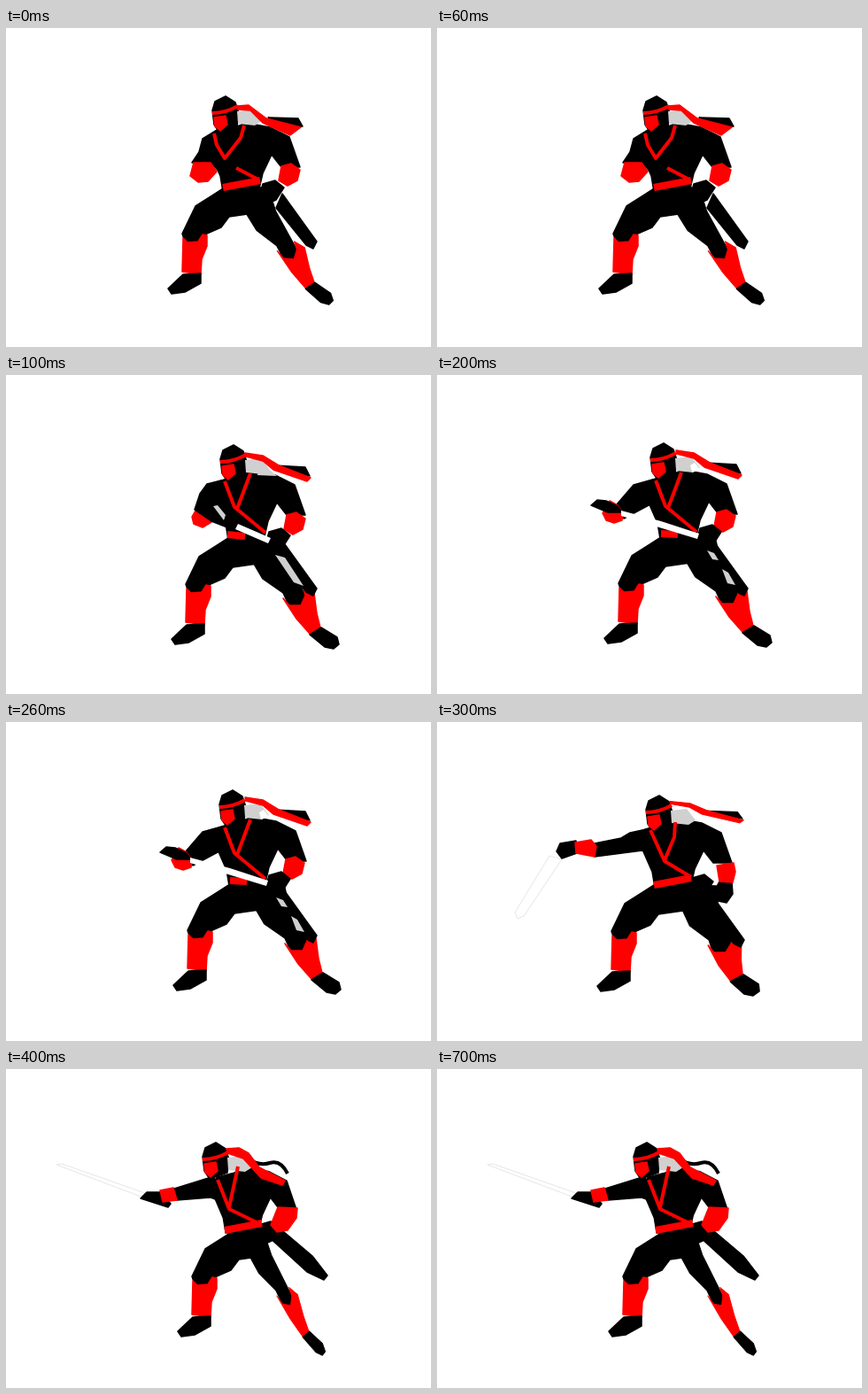
Recreate the animation shown at these times as an HTML page without scripts. Size 480 by 360 pixels, loop 0.9 s.

```html
<!DOCTYPE html>
<html lang="en">
<head>
<meta charset="utf-8">
<title>Ninja draws a sword</title>
<style>
  html, body { margin: 0; width: 100%; height: 100%; overflow: hidden; background: #fff; }
  svg { display: block; width: 100vw; height: 100vh; }
  path { fill: #000; stroke: #000; stroke-width: 1.5; stroke-linejoin: round; }
  .red { fill: #fe0000; stroke: #fe0000; }
  .grey { fill: #d0d0d0; stroke: none; }
  .steel { fill: #fff; stroke: none; }
  .edge { fill: #fff; stroke: #e6e6e6; stroke-width: 1; }
  .trim { fill: none; stroke: #fe0000; stroke-width: 4; }
  .belt { stroke-width: 8; }
  .ribbon { fill: none; stroke-width: 4; }
  .hip { transform-origin: 285px 200px; }
  .waist { transform-origin: 251px 186px; }
  .tip { transform-origin: 344px 115px; }

  .pose { visibility: hidden; animation: flash .9s calc(var(--n) * .1s) step-end infinite; }
  .last { animation-name: hold; }
  @keyframes flash { 0% { visibility: visible } 11.1111%, 100% { visibility: hidden } }
  @keyframes hold { 0% { visibility: visible } 55.5556%, 100% { visibility: hidden } }
</style>
</head>
<body>
<svg viewBox="0 0 480 360">
  <defs>
    <g id="head">
      <path d="M242 95L245 85 257 79 268 86 272 98 270 113 250 120 244 111Z"/>
      <path class="grey" d="M270 96L288 94 298 107 290 112 271 110Z"/>
      <path class="trim" d="M242 98Q257 98 271 90"/>
      <path class="red" d="M244 103L257 101 259 111 251 118 245 113Z"/>
    </g>
    <g id="tail">
      <path d="M303 102L338 104 343 114 324 109Z"/>
      <path class="red" d="M270 88L290 91 308 102 344 116 340 120 302 107 290 97 271 92Z"/>
    </g>
    <path id="chest" d="M240 120L260 115 277 108 304 113 326 124 338 158 317 158 306 144 296 165 292 182 251 186 248 168 237 143Z"/>
    <path id="hand" d="M297 177L311 173 321 181 312 195 303 199 294 188Z"/>
    <path id="glove" class="red" d="M317 158L328 155 338 162 335 174 324 180 314 174Z"/>
    <path id="belt" class="trim belt" d="M245 182L287 174"/>
    <path id="sheath" d="M305 203L312 187 351 241 347 249 339 245Z"/>
    <path id="collar" class="trim" d="M247 120L258 149 293 178M276 111L261 151"/>
    <g id="left">
      <path d="M251 184L237 193 218 205 203 236 206 245 222 246 231 236 247 229 256 217 284 213 292 184Z"/>
      <path class="red" d="M204 241L209 246 221 245 226 237 231 238 231 250 225 265 224 282 203 279Z"/>
      <path d="M204 282L224 281 224 292 206 302 191 304 187 298Z"/>
    </g>
    <g id="right">
      <path d="M270 184L280 213 290 230 313 246 319 259 333 260 338 249 317 207 312 185Z"/>
      <path class="red" d="M313 252L320 260 333 260 338 249 336 240 348 246 351 269 355 285 343 292 328 275Z"/>
      <path d="M343 293L356 285 374 296 376 304 370 309 360 307Z"/>
    </g>
  </defs>

  <!-- guard -->
  <g class="pose" style="--n:0">
    <use href="#left" x="-4" y="-4"/>
    <use href="#right" class="hip" transform="matrix(.9 .06 .12 1 -10 -2)"/>
    <use href="#sheath"/>
    <use href="#chest" x="-6" y="-1"/>
    <path d="M240 114L222 125 218 140 210 152 231 152 243 164 250 150Z"/>
    <use href="#head" x="-9" y="-2"/>
    <path d="M296 101L330 102 335 111 320 112Z"/>
    <path class="red" d="M261 88L274 87 294 102 333 112 321 121 290 107 276 93 262 92Z"/>
    <path class="red" d="M212 152L231 152 238 162 228 173 217 174 208 167Z"/>
    <use href="#glove" x="-6" y="-2"/>
    <use href="#hand" x="-7" y="-1"/>
    <use href="#belt" y="-2"/>
    <path class="trim" d="M235 119L238 132 247 147 265 124 269 110M260 158L283 170"/>
  </g>

  <!-- grip -->
  <g class="pose" style="--n:1">
    <use href="#left"/>
    <use href="#right"/>
    <use href="#sheath"/>
    <path class="grey" d="M304 203L315 206 336 238 325 234Z"/>
    <use href="#chest"/>
    <path class="red" d="M214 153L232 166 222 172 212 168 210 160Z"/>
    <path d="M247 118L227 123 219 134 213 152 232 165 250 172 246 140Z"/>
    <use href="#head"/>
    <path class="grey" d="M286 97L306 114 284 113Z"/>
    <use href="#tail"/>
    <use href="#glove"/>
    <path class="trim belt" d="M250 180L270 182"/>
    <use href="#collar"/>
    <path class="grey" d="M234 148L239 147 248 158 246 164Z"/>
    <use href="#hand"/>
    <path class="steel" d="M262 168L299 184 296 190 259 174Z"/>
  </g>

  <!-- unsheathe -->
  <g class="pose" style="--n:2">
    <use href="#left" x="2" y="-1"/>
    <use href="#right" x="2" y="-2"/>
    <use href="#sheath"/>
    <path class="grey" d="M305 198L313 201 318 209 311 208ZM322 219L329 223 337 237 328 235Z"/>
    <use href="#chest" x="1" y="-1"/>
    <path d="M247 117L222 124 203 146 211 162 239 147 250 140Z"/>
    <path class="red" d="M195 142L204 147 210 156 209 164 200 167 191 164 187 156Z"/>
    <path d="M174 147L181 141 191 142 204 148 209 155 193 155Z"/>
    <use href="#head" x="-1" y="-2"/>
    <use href="#tail" y="-3"/>
    <path class="steel" d="M286 102L291 99 297 107 288 110Z"/>
    <use href="#glove" x="-1" y="-3"/>
    <path class="trim belt" d="M253 179L272 180"/>
    <use href="#collar" y="-1"/>
    <use href="#hand" y="-4"/>
    <path class="steel" d="M208 153L253 165 296 179 294 185 208 159Z"/>
  </g>

  <!-- swing -->
  <g class="pose" style="--n:3">
    <path class="edge" d="M127 151L141 155 98 219 91 222 88 215Z"/>
    <use href="#left" x="-6"/>
    <use href="#right" class="hip" transform="matrix(1.04 0 -.15 1 0 0)"/>
    <use href="#sheath" x="-4" y="5"/>
    <use href="#chest" x="-5" y="1"/>
    <path d="M241 120L218 125 208 131 178 137 178 152 232 145 245 150Z"/>
    <path d="M135 146L139 137 157 134 158 148 141 154Z"/>
    <use href="#head" x="-6" y="4"/>
    <use href="#tail" class="tip" transform="matrix(1.12 0 0 .76 2 -5)"/>
    <use href="#hand" x="-9" y="-1"/>
    <path d="M319 180L333 180 334 194 327 204 308 200Z"/>
    <path class="red" d="M316 162L335 159 337 169 334 181 319 180Z"/>
    <path class="red" d="M156 136L174 133 180 140 178 152 157 148Z"/>
    <use href="#belt" y="2"/>
    <path class="trim" d="M241 122L257 157 287 175M269 113L268 130 257 156"/>
  </g>

  <!-- point -->
  <g class="pose last" style="--n:4">
    <path class="edge" d="M57 108L63 107 157 140 155 145Z"/>
    <use href="#left" x="7" y="-2"/>
    <use href="#right" class="hip" transform="matrix(.7 .13 .2 1.04 -9 -1.5)"/>
    <path d="M295 188L307 178 346 211 363 233 359 238 340 229Z"/>
    <use href="#chest" class="waist" transform="matrix(.92 0 0 .95 -3 -1)"/>
    <path d="M235 121L190 135 193 148 231 145 245 150Z"/>
    <path d="M152 146L159 139 174 139 186 152 183 156Z"/>
    <use href="#head" x="-20" y="4"/>
    <path class="ribbon" d="M273 101Q286 110 298 106T318 118"/>
    <path class="red" d="M249 90L263 89 274 95 286 111 315 126 312 131 288 123 268 101 250 95Z"/>
    <use href="#hand" x="-12" y="-1"/>
    <path class="red" d="M307 156L329 157 328 168 318 182 306 184 299 176Z"/>
    <path class="red" d="M174 137L189 134 193 148 177 150Z"/>
    <use href="#belt" x="2"/>
    <path class="trim" d="M239 125L252 158 287 175M262 110L252 156"/>
  </g>
</svg>
</body>
</html>
```
